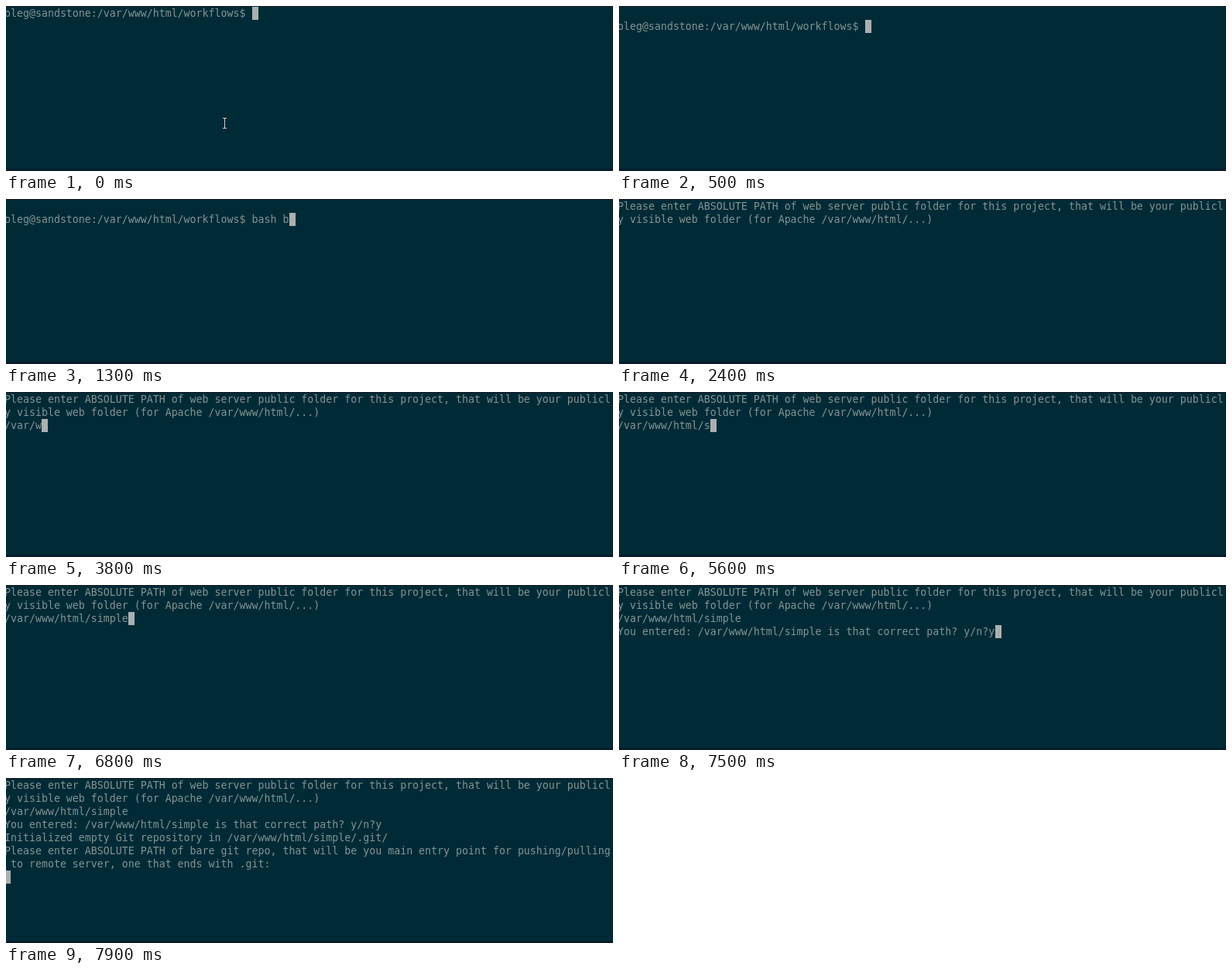
An HTML page for the animation above (8 s loop, 784 by 214 pixels).

```html
<!DOCTYPE html>
<html lang="en">
<head>
<meta charset="utf-8">
<title>Terminal session</title>
<style>
  html, body { margin: 0; width: 100%; height: 100%; overflow: hidden; background: #002b36; }
  #stage { position: relative; width: 784px; height: 214px; overflow: hidden; background: #002b36; }
  #text {
    position: absolute; left: -2px; top: 1px; margin: 0;
    font: 13.288px/17px "DejaVu Sans Mono", monospace;
    color: #839496; white-space: pre;
  }
  #caret { position: absolute; width: 8px; height: 17px; background: #a9b0b1; }
  .edge { position: absolute; }
  .top { left: 0; top: 0; width: 784px; height: 1px; background: #1b1c26; }
  .right { right: 0; top: 0; width: 1px; height: 214px; background: #0a2230; }
  .bottom { left: 0; bottom: 0; width: 784px; height: 3px; background: #071c2d; }
  #pointer { position: absolute; left: 279px; top: 144px; }
</style>
</head>
<body>
<div id="stage">
  <pre id="text"></pre>
  <div id="caret"></div>
  <svg id="pointer" width="7" height="16" fill="none">
    <path d="M1 1.5H6M3.5 1.5V14.5M1 14.5H6" stroke="#001820" stroke-width="3"/>
    <path d="M1 1.5H6M3.5 1.5V14.5M1 14.5H6" stroke="#d5dcdd"/>
  </svg>
  <div class="edge top"></div>
  <div class="edge right"></div>
  <div class="edge bottom"></div>
</div>
<script>
  const LOOP = 8000, COLS = 8, ROWS = 17;
  const text = document.getElementById("text");
  const caret = document.getElementById("caret");
  const pointer = document.getElementById("pointer");

  const prompt = "oleg@sandstone:/var/www/html/workflows$ ";
  const askPublic =
    "Please enter ABSOLUTE PATH of web server public folder for this project, that will be your publicl\n" +
    "y visible web folder (for Apache /var/www/html/...)\n";
  const path = "/var/www/html/simple";
  const confirm = `\nYou entered: ${path} is that correct path? y/n?`;
  const askRepo =
    `\nInitialized empty Git repository in ${path}/.git/\n` +
    "Please enter ABSOLUTE PATH of bare git repo, that will be you main entry point for pushing/pulling\n" +
    " to remote server, one that ends with .git:\n";

  // Each step sets the whole screen from its time onward.
  const steps = [];
  let screen = "";
  const show = (time, value, hasCaret = true) => {
    screen = value;
    steps.push({ time, value, hasCaret });
  };
  const type = (start, gap, chars) =>
    [...chars].forEach((c, i) => show(start + i * gap, screen + c));

  show(0, prompt);
  show(460, "\n" + prompt);
  type(660, 120, "bash b");
  type(1360, 75, "uild.sh");
  show(1960, askPublic, false);
  type(2660, 200, "/var/w");
  type(3860, 210, "ww/html/");
  type(5550, 230, "simple");
  show(6960, screen + confirm);
  type(7350, 0, "y");
  show(7560, screen + askRepo);

  let current = null;
  function render(time) {
    const step = steps.findLast(s => s.time <= time);
    if (step === current) return;
    current = step;
    const lines = step.value.split("\n");
    const row = lines.length - 1;
    text.textContent = step.value;
    caret.style.left = lines[row].length * COLS - 2 + "px";
    caret.style.top = row * ROWS + 1 + "px";
    caret.hidden = !step.hasCaret;
    pointer.style.display = step.time < 460 ? "block" : "none";
  }

  const start = performance.now();
  function tick() {
    render((performance.now() - start) % LOOP);
    requestAnimationFrame(tick);
  }
  tick();
</script>
</body>
</html>
```
